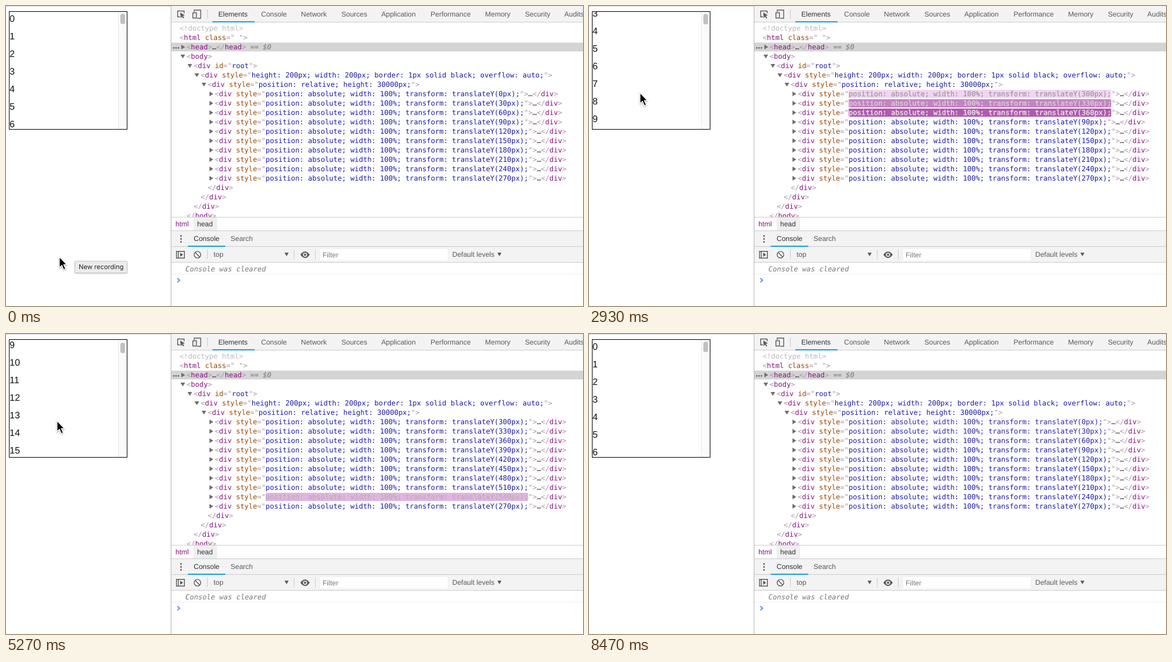
These frames come from a looping animation (984x512 px, 8.54 s). An HTML page:

```html
<!DOCTYPE html>
<html lang="en">
<head>
<meta charset="utf-8">
<title>Virtual list in the inspector</title>
<style>
  html, body { margin: 0; width: 100%; height: 100%; overflow: hidden; background: #fff; }
  svg { display: block; }
  text { font: 12px "Liberation Sans", Arial, sans-serif; fill: #5a5a5a; text-rendering: geometricPrecision; white-space: pre; }
  .mono { font-family: "DejaVu Sans Mono", monospace; }
  .code { fill: #a894a6; }
  .n { fill: #881280; }
  .a { fill: #994500; }
  .v { fill: #1a1aa6; stroke-width: .35px; }
  .dark { fill: #333; }
  .grey { fill: #777; }
  .num { font-size: 16px; fill: #111; }
  .tip { font: 11px Inter, sans-serif; fill: #222; }
  .i { font-style: italic; }
  .line { fill: none; stroke: #5a5a5a; stroke-width: 1.4; }
</style>
</head>
<body>
<svg id="stage" width="984" height="512" viewBox="0 0 984 512"></svg>
<script>
const LOOP = 8540, STEP = 1000 / 15, FADE = 1400;
const CHAR = 7.224, ROWS = 10, ITEM = 30, INDENT = 356;

// [ms, value] points joined by a monotone curve
const SCROLL = [
  [0, 0], [1470, 0], [1730, 6], [1870, 8], [2100, 30], [2200, 42], [2400, 53], [2640, 57],
  [2750, 61], [2860, 90], [3000, 106], [3170, 120], [3370, 150], [3510, 180], [3570, 210],
  [3600, 222], [3670, 241], [3800, 255], [4100, 262], [4600, 266], [4800, 270], [5000, 273],
  [5290, 273], [5350, 269], [5500, 263], [5900, 256], [6200, 250], [6330, 240], [6450, 210],
  [6505, 180], [6533, 164], [6600, 156], [6800, 152], [6960, 151], [7020, 150], [7115, 120],
  [7150, 90], [7175, 60], [7200, 22], [7240, 0], [LOOP, 0]
];
const POINTER = [[0, 428], [70, 428], [330, 405], [600, 405], [1330, 148], [7400, 148], [7750, -30], [LOOP, -30]];

function curve(pts) {
  const d = pts.slice(1).map(([t, v], i) => (v - pts[i][1]) / (t - pts[i][0]));
  const slope = i => {
    const a = d[i - 1] || 0, b = d[i] || 0;
    return a * b > 0 ? 2 * a * b / (a + b) : 0;
  };
  return t => {
    let i = 0;
    while (i < pts.length - 2 && t >= pts[i + 1][0]) i++;
    const [t0, v0] = pts[i], [t1, v1] = pts[i + 1], h = t1 - t0;
    const u = (t - t0) / h, w = 1 - u;
    return v0 * (1 + 2 * u) * w * w + v1 * u * u * (3 - 2 * u)
      + h * u * w * (slope(i) * w - slope(i + 1) * u);
  };
}
const scrollAt = curve(SCROLL), pointerAt = curve(POINTER);

// drawing helpers
const rect = (x, y, w, h, fill, more = '') => `<rect x="${x}" y="${y}" width="${w}" height="${h}" fill="${fill}" ${more}/>`;
const path = (d, fill, more = '') => `<path d="${d}" fill="${fill}" ${more}/>`;
const line = (d, more = '') => `<path d="${d}" class="line" ${more}/>`;
const text = (x, y, s, cls = '', more = '') => `<text x="${x}" y="${y}" class="${cls}" ${more}>${s}</text>`;
const span = (cls, s) => `<tspan class="${cls}">${s}</tspan>`;
const open = (name, attr, val) =>
  '&lt;' + span('n', name) + (attr ? ` ${span('a', attr)}="${span('v', val)}"` : '') + '&gt;';
const close = name => `&lt;/${span('n', name)}&gt;`;
const code = (k, x, s) => text(x, 42 + 16 * k, s, 'mono code');
const opened = (k, x) => path(`M${x - 10.5} ${35 + 16 * k}h8l-4 6.5z`, '#6e6e6e');
const closed = (k, x) => path(`M${x - 9} ${34 + 16 * k}v8l6.5-4z`, '#6e6e6e');
const drop = (x, y) => path(`M${x} ${y}h7l-3.5 6z`, '#5a5a5a');
const bar = (x, y) => rect(x, y, 1, 16, '#ccc');

function page() {
  let nums = '';
  for (let i = 0; i <= 20; i++) nums += text(0, 17 + ITEM * i, i, 'num');
  return rect(5.5, 9.5, 201, 201, '#fff', 'stroke="#000"')
    + `<svg x="6" y="10" width="200" height="200"><g id="list">${nums}</g>`
    + rect(185, 0, 15, 200, '#fafafa') + rect(185, 0, 1, 200, '#e8e8e8')
    + rect(189, 3, 8, 18, '#c1c1c1', 'rx="4" id="thumb"') + '</svg>';
}

function tree() {
  const outer = 'height: 200px; width: 200px; border: 1px solid black; overflow: auto;';
  let s = rect(282, 62.5, 702, 15, '#d4d4d4')
    + code(0, 296, '<tspan fill="#b8b8b8">&lt;!doctype html&gt;</tspan>')
    + code(1, 296, open('html', 'class', ' '))
    + code(2, 308, open('head') + span('dark', '…') + close('head')
      + ` ${span('grey', '==')} ${span('grey i', '$0')}`)
    + closed(2, 308)
    + [286, 290, 294].map(x => `<circle cx="${x}" cy="71.5" r="1.3" fill="#5a5a5a"/>`).join('')
    + code(3, 308, open('body')) + opened(3, 308)
    + code(4, 320, open('div', 'id', 'root')) + opened(4, 320)
    + code(5, 332, open('div', 'style', outer)) + opened(5, 332)
    + code(6, 344, open('div', 'style', 'position: relative; height: 30000px;')) + opened(6, 344);
  for (let r = 0; r < ROWS; r++) {
    s += rect(INDENT + 12 * CHAR, 143 + 16 * r, 0, 14, 'transparent', 'rx="2" class="flash"')
      + `<g class="row">${code(7 + r, INDENT, open('div', 'style', '') + span('dark', '…') + close('div'))}</g>`
      + closed(7 + r, INDENT);
  }
  return s + code(17, 344, close('div')) + code(18, 332, close('div'))
    + code(19, 320, close('div')) + code(20, 308, close('body'));
}

function toolbars() {
  const tabs = { Elements: 362, Console: 435, Network: 503, Sources: 572, Application: 640,
    Performance: 724, Memory: 817, Security: 885, Audits: 952 };
  return rect(282, 0, 702, 27, '#f3f3f3') + rect(282, 27, 702, 1, '#ccc')
    + Object.entries(tabs).map(([s, x]) => text(x, 18, s, x < 400 ? 'dark' : '')).join('')
    + rect(352, 26, 72, 2, '#1a9fdc') + bar(343, 6)
    // inspect and device icons
    + line('M297 18.5h-4.3v-10h11v4')
    + path('M297 11l8 5-3.6.8 2.6 3.2-1.5 1.2-2.6-3.3-1.7 3z', '#5a5a5a')
    + line('M321 10v-3h11v14h-6') + line('M318.7 11.5h6v9h-6z')
    // breadcrumbs
    + rect(282, 360, 702, 24, '#fff') + rect(282, 360, 702, 1, '#ccc')
    + rect(320, 361, 40, 22, '#efefef')
    + text(289, 376, 'html', 'n') + text(326, 376, 'head', 'dark')
    // drawer
    + rect(282, 384, 702, 54, '#f3f3f3')
    + [383, 410, 437].map(y => rect(282, y, 702, 1, '#ccc')).join('')
    + [392.5, 397.5, 402.5].map(y => `<circle cx="298.5" cy="${y}" r="1.4" fill="#5a5a5a"/>`).join('')
    + text(320, 401, 'Console', 'dark') + text(383, 401, 'Search')
    + rect(310, 409, 64, 2, '#1a9fdc')
    + line('M290.7 418.7h13.6v11.6h-13.6zM293.7 418.7v11.6') + path('M297 421v7l5-3.5z', '#5a5a5a')
    + '<circle cx="326.5" cy="424.5" r="5.6" class="line"/>' + line('M322.5 420.5l8 8')
    + bar(343, 416) + text(354, 428, 'top') + drop(475, 421) + bar(491, 416)
    + path('M502 424.5q8-11 16 0q-8 11-16 0z', '#5a5a5a')
    + '<circle cx="510" cy="424.5" r="3.6" fill="#f3f3f3"/><circle cx="510" cy="424.5" r="2" fill="#5a5a5a"/>'
    + bar(527, 416) + rect(536, 415, 217, 19, '#fff') + text(540, 429, 'Filter', 'grey')
    + text(761, 428, 'Default levels') + drop(838, 421)
    // messages
    + rect(282, 438, 702, 74, '#fff') + text(306, 453, 'Console was cleared', 'mono grey i')
    + rect(282, 457, 702, 1, '#f0f0f0')
    + line('M292.3 464.5l3.6 3.5-3.6 3.5', 'style="stroke:#367cf1;stroke-width:1.7"');
}

const overlay = () => `<g id="tip">${rect(117.5, 435.5, 89, 20, '#ececec', 'stroke="#c6c6c6" rx="1" style="filter:drop-shadow(0 1px 1px #0003)"')}`
  + text(124, 449, 'New recording', 'tip') + '</g><g id="pointer" style="filter:drop-shadow(0 1px 1px #0006)">'
  + path('M0 0V18.6L4.2 14.7 7.4 22 10.6 20.6 7.4 13.5H12.8Z', '#000', 'stroke="#fff" stroke-width="1.3"') + '</g>';

const stage = document.getElementById('stage');
stage.innerHTML = rect(0, 0, 984, 1, '#d4d4d4') + page() + tree() + toolbars()
  + rect(281, 0, 1, 512, '#b4b4b4') + overlay();

const $ = id => document.getElementById(id);
const list = $('list'), thumb = $('thumb'), tip = $('tip'), pointer = $('pointer');

// highlight of a changed attribute, scrubbed by age
function flash(el, frames) {
  const easing = 'cubic-bezier(0, 0, .2, 1)';
  const anim = el.animate(frames.map((f, i) => ({ ...f, easing, offset: [0, .8, 1][i] })), FADE);
  anim.pause();
  return anim;
}
const flashes = [...document.querySelectorAll('.flash')];
const rows = [...document.querySelectorAll('.row')].map((g, r) => {
  const val = g.querySelector('.v'), back = flashes[r];
  return {
    val, back, log: [],
    anims: [
      flash(back, [{ fill: 'rgb(158,54,153)' }, { fill: 'rgb(245,219,244)' }, { fill: 'rgba(245,219,244,0)' }]),
      flash(val, [{ fill: '#fff', stroke: '#fff' }, { fill: '#a894a6', stroke: '#a894a6' },
        { fill: '#1a1aa6', stroke: 'rgba(26,26,166,0)' }])
    ]
  };
});

// each row is recycled for the one visible item that shares its remainder
const itemOf = (r, scroll) => {
  const start = Math.floor(scroll / ITEM + 1e-6);
  return start + ((r - start) % ROWS + ROWS) % ROWS;
};
rows.forEach((row, r) => {
  for (let t = 0; t < LOOP; t += 5) {
    const item = itemOf(r, scrollAt(t)), last = row.log[row.log.length - 1];
    if (!last || last.item !== item) row.log.push({ t: last ? t : -FADE, item });
  }
});

function draw(t) {
  const scroll = Math.round(scrollAt(t));
  list.setAttribute('transform', `translate(0 ${-scroll})`);
  thumb.setAttribute('y', 3 + scroll * .006);
  for (const row of rows) {
    const { t: since, item } = row.log.filter(e => e.t <= t).pop();
    const s = `position: absolute; width: 100%; transform: translateY(${item * ITEM}px);`;
    if (row.val.textContent !== s) row.val.textContent = s;
    row.back.setAttribute('width', s.length * CHAR);
    row.anims.forEach(a => { a.currentTime = Math.min(t - since, FADE); });
  }
  const y = pointerAt(t);
  pointer.setAttribute('transform', `translate(${87 + 4 * Math.max(0, y - 148) / 280} ${y})`);
  tip.setAttribute('opacity', Math.max(0, Math.min(1, (730 - t) / 130)));
}

const began = performance.now();
function tick() {
  const t = (performance.now() - began) % LOOP;
  draw(Math.floor((t + 5) / STEP) * STEP);
  requestAnimationFrame(tick);
}
tick();
</script>
</body>
</html>
```
